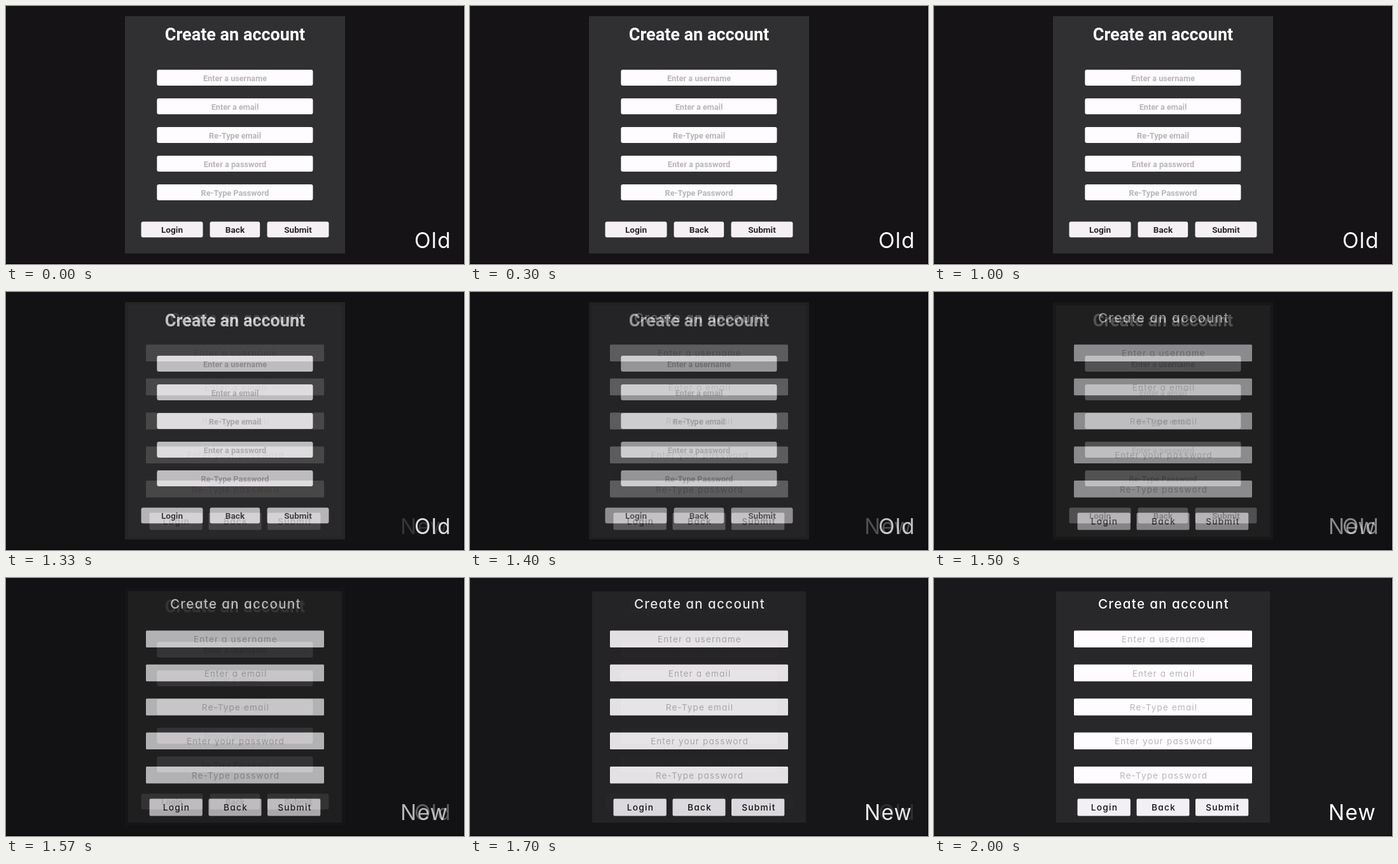
An HTML page for the animation above (3 s loop, 720 px wide and 405 px high).

```html
<!DOCTYPE html>
<html lang="en">
<head>
<meta charset="utf-8">
<title>Form redesign</title>
<style>
html, body { margin: 0; width: 100%; height: 100%; overflow: hidden; background: #000; }
svg { display: block; width: 720px; height: 405px; }
text { text-anchor: middle; }
#before { font: 700 12.7px Roboto, sans-serif; }
#after { font: 400 13.5px Inter, sans-serif; letter-spacing: 1.15px; }
#after, .label { font-feature-settings: "cv11"; }
.title { fill: #fff; }
.hint { fill: #b8b6b9; }
#before .title { font-size: 27px; }
#after .title { font-size: 20.5px; font-weight: 500; letter-spacing: 1.4px; }
#before .action { font-size: 13.6px; fill: #29272a; }
#after .action { font-size: 13.7px; font-weight: 500; letter-spacing: 1.3px; fill: #111013; }
.label { font: 400 33.5px Inter, sans-serif; letter-spacing: 1.2px; fill: #fff; text-anchor: start; }
</style>
</head>
<body>
<svg viewBox="0 0 720 405">
  <g id="before"></g>
  <g id="after"></g>
  <text id="oldLabel" class="label" x="642" y="380">Old</text>
  <text id="newLabel" class="label" x="620" y="380">New</text>
</svg>
<script>
const $ = id => document.getElementById(id);

const rect = (x, y, w, h, fill, r = 0) =>
  `<rect x="${x}" y="${y}" width="${w}" height="${h}" rx="${r}" fill="${fill}"/>`;
const text = (kind, x, y, s) => `<text class="${kind}" x="${x}" y="${y}">${s}</text>`;

function form({ back, panel, title, field, hints, button, actions }) {
  const [x, y, w, h, step, r, base] = field;
  const [by, bh, br, fill, bBase] = button;
  return rect(0, 0, 719, 404, back) + rect(...panel) +
    text("title", ...title, "Create an account") +
    hints.map((s, i) =>
      rect(x, y + i * step, w, h, "#fefcff", r) +
      text("hint", title[0], base + i * step, s)).join("") +
    actions.map(([s, bx, bw, cx]) =>
      rect(bx, by, bw, bh, fill, br) + text("action", cx, bBase, s)).join("");
}

$("before").innerHTML = form({
  back: "#151316",
  panel: [187, 16, 346, 372.5, "#302f31", 1],
  title: [360, 54],
  field: [237.3, 100, 245.2, 25, 45, 3, 117.5],
  hints: ["Enter a username", "Enter a email", "Re-Type email", "Enter a password", "Re-Type Password"],
  button: [338.5, 24.8, 3, "#f4f0f4", 355.8],
  actions: [["Login", 212.5, 97, 261], ["Back", 320.5, 78.7, 360], ["Submit", 410.5, 97, 459]]
});

$("after").innerHTML = form({
  back: "#19181b",
  panel: [192, 21, 336, 363, "#282729", 1],
  title: [361, 47.5],
  field: [220, 82.5, 280, 26.5, 53.35, 1.5, 101.2],
  hints: ["Enter a username", "Enter a email", "Re-Type email", "Enter your password", "Re-Type password"],
  button: [346.5, 27, 2, "#f2f0f4", 365],
  actions: [["Login", 225.5, 83.3, 268], ["Back", 318.5, 83, 361], ["Submit", 411, 83.3, 454]]
});

const easeInOut = p => p < .5 ? 4 * p ** 3 : 1 - 4 * (1 - p) ** 3;

// Both forms fade over black, so the stage dims halfway through.
function draw() {
  const t = performance.now() % 3000;
  const k = easeInOut(Math.min(1, Math.max(0, t / 1000 - 1)));
  for (const id of ["before", "oldLabel"]) $(id).style.opacity = 1 - k;
  for (const id of ["after", "newLabel"]) $(id).style.opacity = k;
  requestAnimationFrame(draw);
}
draw();
</script>
</body>
</html>
```
